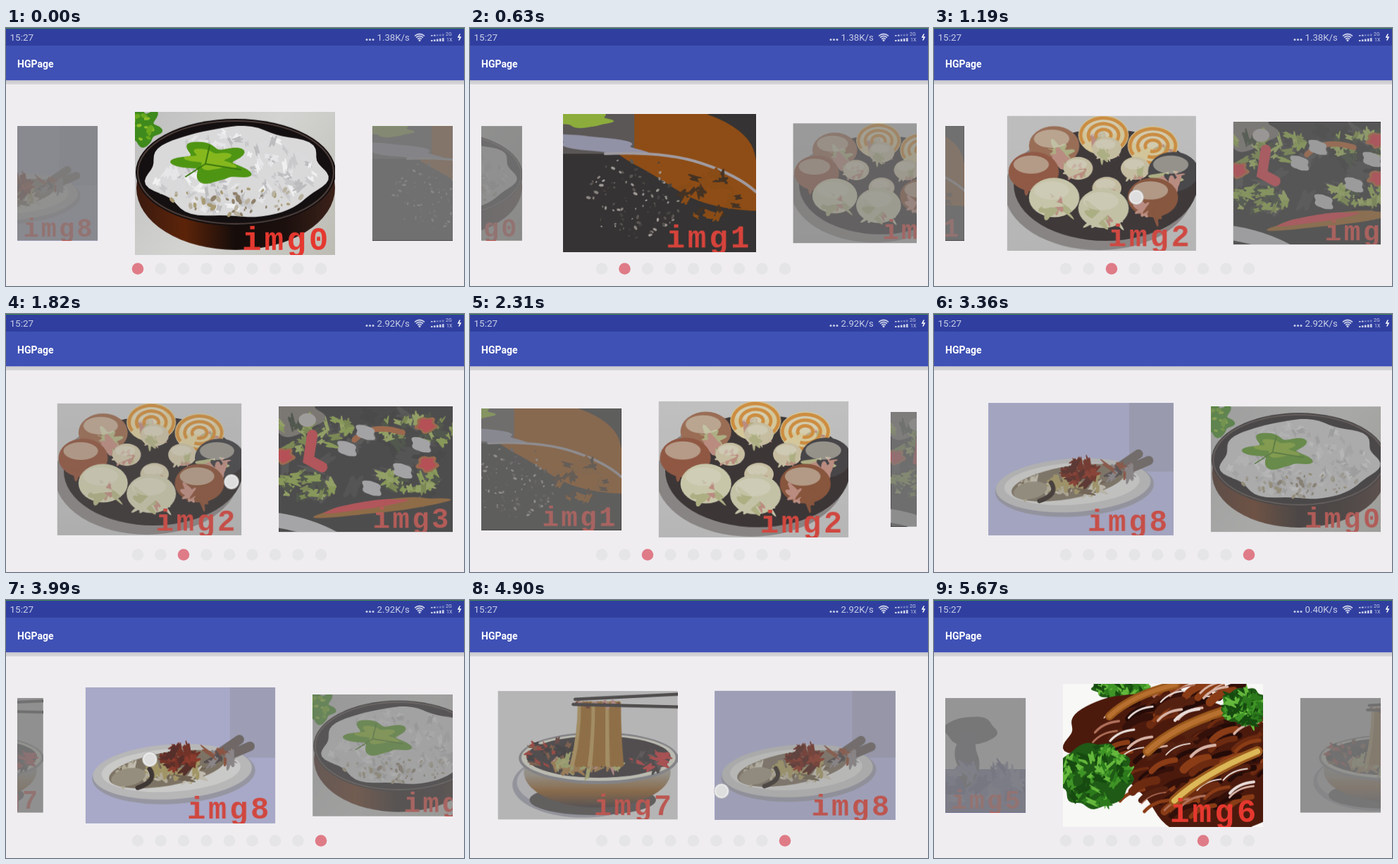
These frames come from a looping animation (650 by 366 pixels, 6.16 s). An HTML page with a canvas:

```html
<!DOCTYPE html>
<html>
<head>
<meta charset="utf-8">
<style>
  html, body { margin: 0; width: 100%; height: 100%; overflow: hidden; background: #efedf0; }
  canvas { display: block; }
</style>
</head>
<body>
<canvas id="stage" width="650" height="366"></canvas>
<script>
const LOOP = 6160, STEP = 70, W = 284, H = 203, GAP = 308.5, COUNT = 9, TAU = Math.PI * 2;
const stage = document.getElementById('stage').getContext('2d');
let c = stage;

// ---------- drawing helpers ----------
let seed = 1;
const rnd = () => (seed = (seed * 16807) % 2147483647) / 2147483647;
const pick = list => list[Math.floor(rnd() * list.length)];

function rect(x, y, w, h, fill) {
  c.fillStyle = fill;
  c.fillRect(x, y, w, h);
}
function ell(x, y, rx, ry, fill, rot = 0) {
  c.fillStyle = fill;
  c.beginPath();
  c.ellipse(x, y, rx, ry, rot, 0, TAU);
  c.fill();
}
function ring(x, y, rx, ry, color, width, from = 0, to = TAU) {
  c.strokeStyle = color;
  c.lineWidth = width;
  c.beginPath();
  c.ellipse(x, y, rx, ry, 0, from, to);
  c.stroke();
}
function line(d, color, width) {
  c.strokeStyle = color;
  c.lineWidth = width;
  c.lineCap = 'round';
  c.stroke(new Path2D(d));
}
// Ellipse with a wavy edge
function blob(x, y, rx, ry, fill, wave = 0.12, lobes = 5, rot = 0) {
  c.fillStyle = fill;
  c.beginPath();
  for (let a = 0; a < TAU; a += 0.08) {
    const r = 1 + wave * Math.sin(lobes * a) + wave * 0.5 * Math.sin((lobes + 2) * a + 1);
    const u = rx * r * Math.cos(a), v = ry * r * Math.sin(a);
    c.lineTo(x + u * Math.cos(rot) - v * Math.sin(rot), y + u * Math.sin(rot) + v * Math.cos(rot));
  }
  c.fill();
}
// Calls paint at n random places within an ellipse
function scatter(n, x, y, rx, ry, paint) {
  for (let i = 0; i < n; i++) {
    const a = rnd() * TAU, r = Math.sqrt(rnd());
    paint(x + rx * r * Math.cos(a), y + ry * r * Math.sin(a));
  }
}
function specks(n, x, y, rx, ry, size, ...colors) {
  scatter(n, x, y, rx, ry, (u, v) => {
    const s = size * (0.4 + rnd());
    ell(u, v, s, s * 0.6, pick(colors), rnd() * 3);
  });
}
function lumps(n, x, y, rx, ry, size, ...colors) {
  scatter(n, x, y, rx, ry, (u, v) =>
    blob(u, v, size * (0.5 + rnd()), size * (0.3 + rnd() * 0.5), pick(colors), 0.25, 4, rnd() * 3));
}
function fade(x0, y0, x1, y1, ...colors) {
  const g = c.createLinearGradient(x0, y0, x1, y1);
  colors.forEach((color, i) => g.addColorStop(i / (colors.length - 1), color));
  return g;
}
function label(text, x, y, font, color) {
  c.font = font;
  c.fillStyle = color;
  c.fillText(text, x, y);
}

// ---------- dishes, each 284 by 203 ----------
function rice() {
  rect(0, 0, W, H, fade(0, 0, W, H, '#bebebe', '#d4d4d2', '#bcbcb4'));
  blob(8, 22, 26, 26, '#3f8a1c', 0.18, 6);
  specks(14, 10, 22, 16, 20, 5, '#8fbf2a', '#6aa81e');
  ell(143, 108, 141, 88, fade(0, 0, W, 0, '#3a1a10', '#5c2409', '#160d0b', '#1c100e', '#3c221a'));
  ell(143, 86, 142, 76, '#140f10');
  ring(143, 86, 139, 73, '#4f403c', 2);
  blob(144, 86, 126, 64, '#d9d9da', 0.04, 7);
  lumps(150, 140, 86, 116, 56, 6, '#f0f0f0', '#e6e6e8', '#c9c9cb', '#dadadc', '#bcbcbe');
  specks(50, 145, 124, 95, 22, 4, '#a89b74', '#b9b2a0', '#8f806a');
  blob(110, 72, 46, 26, '#4f9514', 0.24, 5, 0.2);
  blob(108, 68, 30, 13, '#86b81e', 0.24, 5, 0.2);
  line('M72 92L100 74L106 48M100 74L150 82', '#3a780e', 2);
}

function crust() {
  rect(0, 0, W, H, '#282625');
  blob(190, 60, 130, 60, '#914403', 0.1, 3, 0.45);
  rect(0, 0, 105, 58, '#55504f');
  blob(30, 8, 40, 11, '#8eb430');
  blob(50, 44, 70, 11, '#9595ad', 0.15, 4, 0.15);
  line('M62 58Q150 54 204 72T284 114', '#a5a0a8', 4);
  specks(110, 105, 122, 70, 60, 2.6, '#8b8580', '#55504c', '#a6a09c', '#3c3836');
  lumps(30, 215, 120, 50, 35, 8, '#8a4305', '#3a2514');
}

function ball(x, y, r, color) {
  ell(x, y, r, r * 0.78, color);
  lumps(5, x, y + r * 0.35, r * 0.45, r * 0.18, r * 0.4, '#c98f80', '#b9bb84', color);
  ell(x - r * 0.1, y - r * 0.28, r * 0.7, r * 0.36, 'rgba(235,232,210,.55)');
}
function dumplings() {
  rect(0, 0, W, H, fade(0, 0, 0, H, '#d0d0d0', '#c4c4c4'));
  ell(138, 112, 142, 90, '#8a8584');
  ell(148, 104, 138, 84, '#2b2324');
  const outer = ['#38363a', '#8a4a2c', '#d5d3b0', '#dad8b4', '#944e34', '#a0684a', '#ead9a0', '#ead9a0'];
  const placed = outer.map((color, i) => {
    const a = i * TAU / 8;
    return [145 + 105 * Math.cos(a), 84 + 55 * Math.sin(a), 38, color];
  });
  for (let i = 0; i < 4; i++) {
    const a = i * TAU / 4;
    placed.push([150 + 43 * Math.cos(a), 79 + 30 * Math.sin(a), 22, '#d8cdaa']);
  }
  for (const [x, y, r, color] of placed.sort((a, b) => a[1] - b[1])) {
    ball(x, y, r, color);
    if (color === '#ead9a0')
      for (const k of [0.3, 0.6, 0.9]) ring(x, y, r * k, r * k * 0.75, '#e09030', 5, 2.6, 8.2);
  }
}

function salad() {
  rect(0, 0, W, H, '#1c1a1b');
  lumps(50, 140, 90, 150, 80, 14, '#2c2a2a', '#151314', '#343332');
  blob(20, 12, 50, 34, '#766f68');
  for (const [x, y, r] of [[60, 45, 70], [225, 40, 60], [45, 128, 45], [210, 115, 50]])
    lumps(32, x, y, r, r * 0.42, 9, '#8daf34', '#a3bd4c', '#768f2a', '#23301a');
  ell(46, 22, 14, 11, '#bdb8b4');
  line('M54 46L48 86L70 98', '#e02c36', 17);
  line('M122 54Q150 26 200 42', '#b7521c', 9);
  for (const [x, y] of [[8, 80], [240, 93], [238, 30]]) {
    blob(x, y, 17, 13, '#b7521c');
    blob(x, y, 12, 10, '#e8202e');
  }
  blob(165, 162, 105, 10, '#9a5710', 0.1, 3, -0.12);
  blob(140, 160, 65, 6, '#e02c36', 0.1, 3, -0.15);
  for (const [x, y] of [[200, 104], [150, 132], [110, 68], [140, 42], [230, 62]])
    blob(x, y, 17, 11, '#c4c2c6', 0.1, 4, 0.5);
  line('M0 184Q50 192 90 214', '#c9c8cc', 24);
}

function stew() {
  rect(0, 0, W, H, fade(0, 0, 0, H, '#c9c0b4', '#8d7a68'));
  ell(142, 110, 132, 76, '#493126');
  ell(142, 102, 120, 62, '#8c4c22');
  specks(70, 142, 102, 105, 50, 9, '#b4692c', '#6d3219', '#d19a4c', '#6f8a2c');
}

function ladle() {
  rect(0, 0, W, H, '#f6f6f6');
  rect(0, 126, W, 77, '#6a6aa6');
  blob(186, 58, 46, 25, '#4c4c4c', 0.05, 4);
  blob(180, 108, 20, 52, '#505058', 0.1, 4);
  lumps(34, 200, 150, 90, 32, 12, '#50508a', '#7878ae', '#8888b8');
}

function broccoli(x, y, rx, ry) {
  blob(x, y, rx, ry, '#1f5a16', 0.05, 9);
  lumps(70, x, y, rx * 0.92, ry * 0.92, 7, '#3f9426', '#164a10', '#64b83c', '#2c7a1c');
}
function ribs() {
  rect(0, 0, W, H, '#f8f8f6');
  broccoli(82, 4, 40, 18);
  blob(100, 58, 98, 46, '#4c1a0d', 0.08, 5, -0.2);
  blob(205, 120, 116, 94, '#4c1a0d', 0.05, 5, 0.3);
  // Glazed strands along the slope of the meat
  const strands = (n, width, ...colors) => scatter(n, 165, 100, 130, 92, (x, y) => {
    if (x + y > 85 && x + y * 0.25 > 45)
      line(`M${x} ${y}q${12} ${-14} ${34} ${-16}`, pick(colors), width * (0.5 + rnd()));
  });
  strands(110, 8, '#6c2a10', '#34100a', '#8a3c16', '#240b08', '#542010');
  strands(30, 3, '#d8b4a6', '#b0705a', '#e8dcd8');
  for (const [x, y, s] of [[66, 46, 0.8], [120, 96, 0.9], [158, 166, 1]]) {
    const curve = `M${x} ${y}q${40 * s} ${-38 * s} ${118 * s} ${-70 * s * s}`;
    line(curve, '#9a581c', 15 * s);
    line(curve, s < 1 ? '#b87030' : '#dcb858', 8 * s);
  }
  broccoli(258, 32, 32, 26);
  broccoli(46, 130, 52, 46);
}

function noodles() {
  rect(0, 0, W, H, '#dadada');
  ell(135, 148, 112, 52, '#a0a0ae');
  ell(135, 144, 105, 46, '#cfcfd4');
  ell(150, 172, 100, 24, '#4b4646');
  ell(157, 128, 116, 56, fade(0, 105, 0, 185, '#b4b2aa', '#a09888', '#8f5b25', '#353036'));
  ell(159, 106, 126, 41, '#85858c');
  ell(159, 105, 122, 37, '#e2e2d2');
  ell(159, 104, 114, 33, '#302a2c');
  lumps(34, 82, 98, 40, 22, 6, '#a8281e', '#5c2a24', '#7a4a2c', '#241f20');
  lumps(18, 240, 108, 26, 14, 8, '#c23032', '#4a4042', '#332c2e');
  lumps(50, 145, 116, 58, 16, 8, '#c98d86', '#a5ad62', '#a8783c', '#b2b368');
  for (let i = 0; i < 12; i++)
    line(`M${130 + i * 5.5} 20Q${130 + i * 5.5} 70 ${118 + i * 7} 116`, i % 4 ? '#98621f' : '#b99550', 8);
  specks(16, 158, 20, 34, 4, 4, '#c98d86', '#6c2c1a');
  line('M122 13L284 5M119 21L284 25', '#2c2728', 5);
}

function fish() {
  rect(0, 0, W, H, '#b2b4da');
  rect(216, 0, 68, 105, '#a4a5c2');
  ell(132, 130, 122, 44, '#9b9bab', -0.06);
  ell(130, 126, 119, 41, '#c5c5c6', -0.06);
  ell(128, 124, 104, 32, '#dcdcda', -0.06);
  line('M180 112L230 78M190 112L246 88', '#6b6260', 14);
  ell(122, 122, 88, 25, '#7c705e', -0.17);
  lumps(26, 110, 130, 68, 12, 12, '#bcb49c', '#a99a5e', '#cfc9b8', '#6c5a46');
  ell(64, 134, 26, 13, '#9a917e', -0.2);
  line('M96 122Q108 140 78 150', '#2e2420', 7);
  lumps(40, 140, 106, 24, 18, 8, '#6e1f12', '#8c2a18', '#4c1a14');
  lumps(12, 198, 104, 28, 10, 9, '#4c4244', '#8c4a34', '#8d8689');
}

const pages = [rice, crust, dumplings, salad, stew, ladle, ribs, noodles, fish].map((paint, i) => {
  const page = document.createElement('canvas');
  page.width = W;
  page.height = H;
  c = page.getContext('2d');
  seed = 77 + i;
  paint();
  c.letterSpacing = '4px';
  label('img' + i, 152, 196, 'bold 46px "Liberation Mono", monospace', '#e5382f');
  return page;
});
c = stage;

// ---------- motion ----------
// Time, scroll in pages, and the finger's place where a drag is under way
const keys = [
  [0, 0], [980, 2], [1190, 2.283, 287, 240], [1470, 2], [1820, 2.394, 320, 238], [2030, 3],
  [2660, 0], [2800, 0], [2870, 0.363, 292, 244], [3080, 0], [3640, -1],
  [3990, -0.749, 204, 226], [4340, -1], [4900, -1.488, 357, 271], [5670, -3], [LOOP, -3]
];
const slope = i => keys[i] && keys[i + 1]
  ? (keys[i + 1][1] - keys[i][1]) / (keys[i + 1][0] - keys[i][0]) : 0;
function tangent(i) {
  const a = slope(i - 1), b = slope(i);
  return a * b > 0 ? 2 * a * b / (a + b) : 0;
}
// Monotone cubic through the keys
function scrollAt(t) {
  const i = keys.findIndex((k, n) => t < keys[n + 1][0]);
  const [t0, p0] = keys[i], [t1, p1] = keys[i + 1], d = t1 - t0, u = (t - t0) / d, v = 1 - u;
  return v * v * (1 + 2 * u) * p0 + u * u * (3 - 2 * u) * p1
    + d * u * v * (v * tangent(i) - u * tangent(i + 1));
}

// ---------- scene ----------
function header(t) {
  rect(0, 0, 650, 25, '#303f9f');
  rect(0, 0, 650, 1, '#3f8a4c');
  rect(0, 25, 650, 49.5, '#3f51b5');
  rect(0, 74.5, 650, 5.5, fade(0, 74, 0, 80, '#c9c9cc', '#d8d7da'));
  label('HGPage', 16, 55.5, 'bold 14px Roboto, sans-serif', '#fff');
  const ink = '#c9cee8', speed = t < 1610 ? '1.38' : t < 5040 ? '2.92' : '0.40';
  label('15:27', 5.5, 18, '13.5px Roboto, sans-serif', ink);
  label(speed + 'K/s', 526.5, 18, '13.2px Roboto, sans-serif', ink);
  for (let i = 0; i < 3; i++) ell(512 + i * 4.5, 16.5, 1.5, 1.5, ink);
  for (const r of [3.5, 6.5, 9.5]) ring(587, 18, r, r, ink, 1.8, -2.3, -0.84);
  ell(587, 17.5, 1.5, 1.5, ink);
  for (let i = 0; i < 5; i++) {
    rect(603 + i * 4, 10 - i * 0.4, 2.6, 1.5 + i * 0.4, i < 2 ? ink : '#6f7bc0');
    rect(603 + i * 4, 17 - i * 0.7, 2.6, 2 + i * 0.7, ink);
  }
  label('2G', 624, 11, '7px Roboto, sans-serif', ink);
  label('1X', 625, 19, '7px Roboto, sans-serif', ink);
  line('M644 9L642 13H645L643 17', '#fff', 1.6);
}

function draw(t) {
  const p = scrollAt(t), near = Math.round(p), wrap = n => ((n % COUNT) + COUNT) % COUNT;
  rect(0, 0, 650, 366, '#efedf0');
  header(t);

  c.save();
  c.beginPath();
  c.rect(16, 100, 618, 240);
  c.clip();
  for (let n = near - 2; n <= near + 2; n++) {
    const far = Math.min(1, Math.abs(n - p)), k = 1 - 0.2 * far;
    const x = 325 + (n - p) * GAP - W * k / 2, y = 220.3 - H * k / 2;
    c.drawImage(pages[wrap(n)], x, y, W * k, H * k);
    rect(x, y, W * k, H * k, `rgba(128,128,128,${0.82 * far})`);
  }
  c.restore();

  for (let i = 0; i < COUNT; i++)
    ell(187 + i * 32.5, 341.5, 8.3, 8.3, i === wrap(near) ? '#df7b87' : '#e5e4e6');

  const touch = keys.find(k => k[2] && Math.abs(t - k[0]) <= 2 * STEP);
  if (touch && p !== near) {
    const x = touch[2] - (p - touch[1]) * GAP, y = touch[3];
    ell(x, y, 11, 11, 'rgba(190,190,190,.75)');
    ell(x, y, 10, 10, 'rgba(245,245,245,.85)');
    ell(x, y, 8, 8, '#dedede');
  }
}

const start = performance.now();
function frame() {
  const t = (performance.now() - start) % LOOP;
  draw(Math.floor(t / STEP) * STEP);
  requestAnimationFrame(frame);
}
frame();
</script>
</body>
</html>
```
